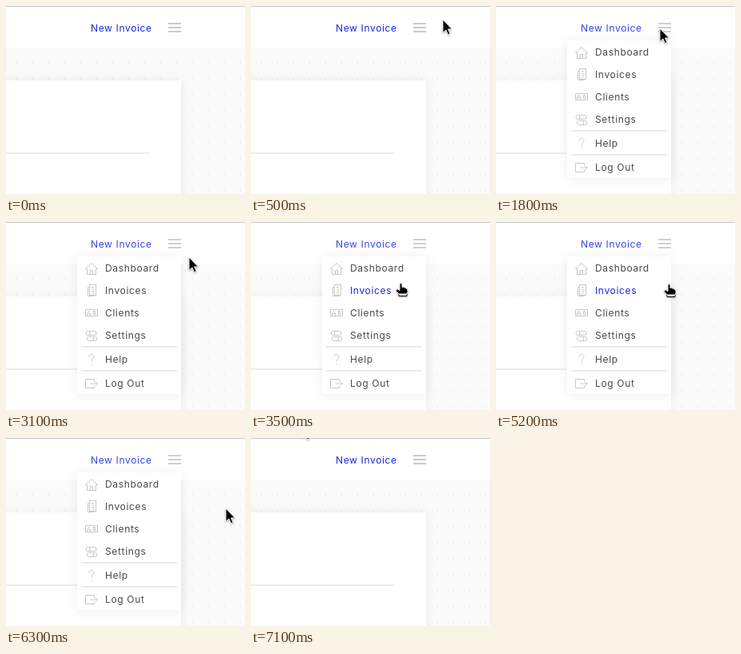
Write an HTML page that moves like this. It is 299 by 235 pixels and loops after 7.2 s.

```html
<!DOCTYPE html>
<html lang="en">
<head>
<meta charset="utf-8">
<title>Invoice menu</title>
<style>
html, body { margin: 0; width: 100%; height: 100%; overflow: hidden; background: #fff; }
svg { display: block; }
text { font: 12px Inter, "Liberation Sans", sans-serif; letter-spacing: .65px; fill: #484848; }
.blue { fill: #1a2ae0; }
.icon { fill: none; stroke: #c8c8c8; }
.shadow { filter: drop-shadow(0 1px 7px rgba(0, 0, 0, .07)); }
.cursor { stroke: #fff; filter: drop-shadow(0 1px 1px rgba(0, 0, 0, .35)); }
</style>
</head>
<body>
<svg width="299" height="235" viewBox="0 0 299 235">
  <defs>
    <pattern id="dots" x="3" y="61" width="20" height="20" patternUnits="userSpaceOnUse">
      <rect x="9" y="9" width="2" height="2" fill="#ededed"/>
    </pattern>
  </defs>
  <rect y="53" width="299" height="182" fill="#fafafa"/>
  <rect y="53" width="299" height="182" fill="url(#dots)"/>
  <rect class="shadow" x="-30" y="93" width="249" height="180" fill="#fff"/>
  <rect y="183" width="179" height="2" fill="#ebebeb"/>
  <text class="blue" x="106" y="32">New Invoice</text>
  <path id="bars" d="M203 22h16M203 27h16M203 32h16" stroke-width="2"/>
  <rect id="veil" y="1" width="299" height="234" fill="#fff"/>
  <rect width="299" height="1" fill="#c6c6c6"/>

  <g id="menu">
    <rect class="shadow" x="89" y="43" width="130" height="172" fill="#fff"/>
    <path d="M94 156h120M94 186h120" stroke="#ebebeb" stroke-width="2"/>
    <g id="items"></g>
  </g>

  <g id="arrow" class="cursor">
    <path d="M0 0V16.5L3.8 13 6.5 18.8 9.2 17.6 6.6 12H11.5Z"/>
  </g>
  <g id="hand" class="cursor">
    <path d="M-2 12H8V15.5H-2Z" fill="#fff" stroke="#000"/>
    <path d="M-1 .5Q.5-1.5 2 .5V4.5Q4 3.5 4.6 5 6.5 4.4 7 6 9 5.8 9 8V10.5L8 13H-2L-5.8 9Q-6 6-3.5 7L-1 8.5Z"/>
  </g>
</svg>
<script>
const $ = id => document.getElementById(id);
const LOOP = 7200, STEP = 100;
const clamp = v => Math.min(1, Math.max(0, v));
const inside = (v, a, b) => v >= a && v < b;
const box = (x, y, w, h, r = 0) => `<rect x="${x}" y="${y}" width="${w}" height="${h}" rx="${r}"/>`;
const line = d => `<path d="${d}"/>`;

const items = [
  ["Dashboard", line("M-7.5 .5L0-6.5 7.5 .5H5.5V7.5H-5.5V.5Z") + box(-1.5, 2.5, 3, 5)],
  ["Invoices", box(-2.5, -7.5, 8, 13) + line("M-2.5-4.5h-2v11h8v-1M0-4.5h3M0-2h3M0 .5h3M0 3h3")],
  ["Clients", box(-7.5, -4.5, 15, 8) + box(-5.5, .5, 4, 3) + box(-4.5, -2.5, 2, 3, 1) + box(2.5, -2.5, 2, 4)],
  ["Settings", box(-7, -5.5, 13, 5, 2.5) + box(-6, 1.5, 13, 5, 2.5) + line("M-2.5-5v4M2.5 2v4")],
  ["Help", line("M-3-3.5A3 3 0 1 1 1.5-.9Q0 0 0 2.5M0 4.8v1.5")],
  ["Log Out", line("M3.5-2.5v-3h-11v11h11v-3M-2 0h9.5M5-2.5L7.5 0 5 2.5")]
];
const middle = i => 58 + 28 * i + 2 * Math.max(0, i - 3);
$("items").innerHTML = items.map(([label, icon], i) =>
  `<g class="icon" transform="translate(107 ${middle(i)})">${icon}</g>
   <text x="124" y="${middle(i) + 4}">${label}</text>`
).join("");
const labels = $("items").querySelectorAll("text");

// Each move follows a curve from a past b to c, then rests there until it is hidden.
const moves = [
  { start: 200, end: 900, hide: 2900, a: [290, 33], b: [220, 2], c: [205, 28] },
  { start: 2900, end: 3500, hide: 5100, a: [205, 28], b: [264, 52], c: [187, 77] },
  { start: 5100, end: 5500, hide: 5500, a: [187, 77], b: [245, 99], c: [310, -40] },
  { start: 6100, end: 6300, hide: 6600, a: [292, 79], b: [282, 86], c: [275, 88] },
  { start: 7100, end: 7200, hide: 7200, a: [64, -17], b: [64, -17], c: [64, -17] }
];

function cursorAt(t) {
  const m = moves.find(m => inside(t, m.start, m.hide));
  if (!m) return null;
  const p = clamp((t - m.start) / (m.end - m.start)), q = 1 - p;
  return [0, 1].map(k => q * q * m.a[k] + 2 * p * q * m.b[k] + p * p * m.c[k]);
}

function draw(now) {
  const t = Math.floor(now % LOOP / STEP) * STEP;
  const open = clamp(Math.min((t - 1600) / 200, (6700 - t) / 300));
  const pos = cursorAt(t), [x, y] = pos || [-99, -99];
  const onBars = !open && inside(x, 200, 220) && inside(y, 14, 40);
  const hovered = open && inside(x, 89, 219)
    ? items.findIndex((_, i) => Math.abs(y - middle(i)) < 14) : -1;
  const pointing = onBars && t < 1500 || hovered >= 0;

  $("menu").setAttribute("opacity", open);
  $("veil").setAttribute("opacity", open * .13);
  $("bars").setAttribute("stroke", onBars ? "#1a2ae0" : "#c9c9c9");
  labels.forEach((label, i) => label.setAttribute("class", i === hovered ? "blue" : ""));
  for (const id of ["arrow", "hand"]) {
    const shown = pos && (id === "hand") === pointing;
    $(id).setAttribute("display", shown ? "inline" : "none");
    $(id).setAttribute("transform", `translate(${Math.round(x)} ${Math.round(y)})`);
  }
}

const start = performance.now();
function tick() {
  draw(performance.now() - start);
  requestAnimationFrame(tick);
}
tick();
</script>
</body>
</html>
```
